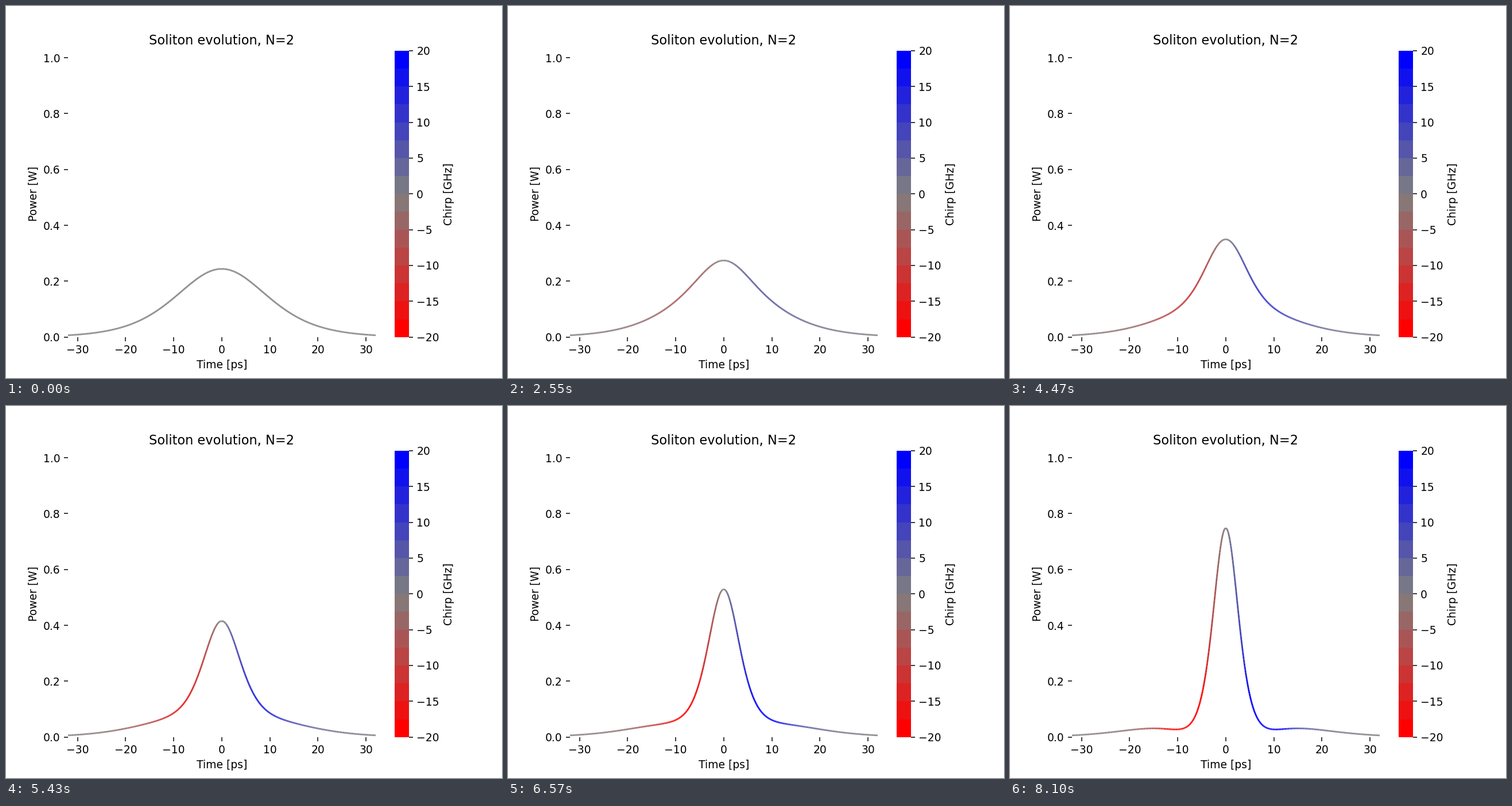
These frames come from a looping animation (864x648 px, 8130 ms). A matplotlib script:

```python
import numpy as np
import matplotlib.pyplot as plt
from matplotlib.animation import FuncAnimation
from matplotlib.cm import ScalarMappable
from matplotlib.collections import LineCollection
from matplotlib.colors import BoundaryNorm, LinearSegmentedColormap, Normalize

FRAMES, INTERVAL = 271, 30
T0 = 12.8                      # pulse width, ps
P0 = 0.08 / (0.002 * T0**2)    # input peak power for N = 2, W
PHASE_STEP = 0.009232          # beat phase advance per frame, rad
CHIRP_MAX = 20

t = np.arange(-321.5, 322) * 0.1
s = t / T0


def soliton(theta):
    """Power (W) and chirp (GHz) of the second-order soliton."""
    turn = 3 * np.exp(1j * theta)
    g = np.cosh(3 * s) + turn * np.cosh(s)
    dg = 3 * np.sinh(3 * s) + turn * np.sinh(s)
    den = np.cosh(4 * s) + 4 * np.cosh(2 * s) + 3 * np.cos(theta)
    power = P0 * np.abs(2 * g / den) ** 2
    chirp = -(dg / g).imag / (2 * np.pi * T0) * 1000
    return power, chirp


plt.rcParams["font.family"] = "DejaVu Sans"
fig, ax = plt.subplots(figsize=(6.4, 4.8), dpi=135)

hues = ["red", "grey", "blue"]
levels = np.linspace(-CHIRP_MAX, CHIRP_MAX, 17)
bands = ScalarMappable(BoundaryNorm(levels, 16),
                       LinearSegmentedColormap.from_list("bands", hues, N=16))
bar = fig.colorbar(bands, ax=ax, ticks=levels[::2], format="%d")
bar.ax.set_yticks(levels[::2],
                  [f"{v:.0f}".replace("-", "\u2212") for v in levels[::2]])
bar.minorticks_off()
bar.outline.set_visible(False)
bar.set_label("Chirp [GHz]")

ax.set(xlim=(-2.5 * T0, 2.5 * T0), ylim=(0, 4.2 * P0),
       xlabel="Time [ps]", ylabel="Power [W]",
       title="Soliton evolution, N=2")
ax.spines[:].set_visible(False)

curve = LineCollection([], linewidths=1.5,
                       cmap=LinearSegmentedColormap.from_list("chirp", hues),
                       norm=Normalize(-CHIRP_MAX, CHIRP_MAX))
ax.add_collection(curve, autolim=False)


def update(i):
    power, chirp = soliton(PHASE_STEP * i)
    points = np.column_stack([t, power])
    curve.set_segments(np.stack([points[:-1], points[1:]], axis=1))
    curve.set_array((chirp[:-1] + chirp[1:]) / 2)
    return curve,


anim = FuncAnimation(fig, update, frames=FRAMES, interval=INTERVAL,
                     init_func=lambda: update(0), repeat=True, repeat_delay=0)
plt.show()
```
